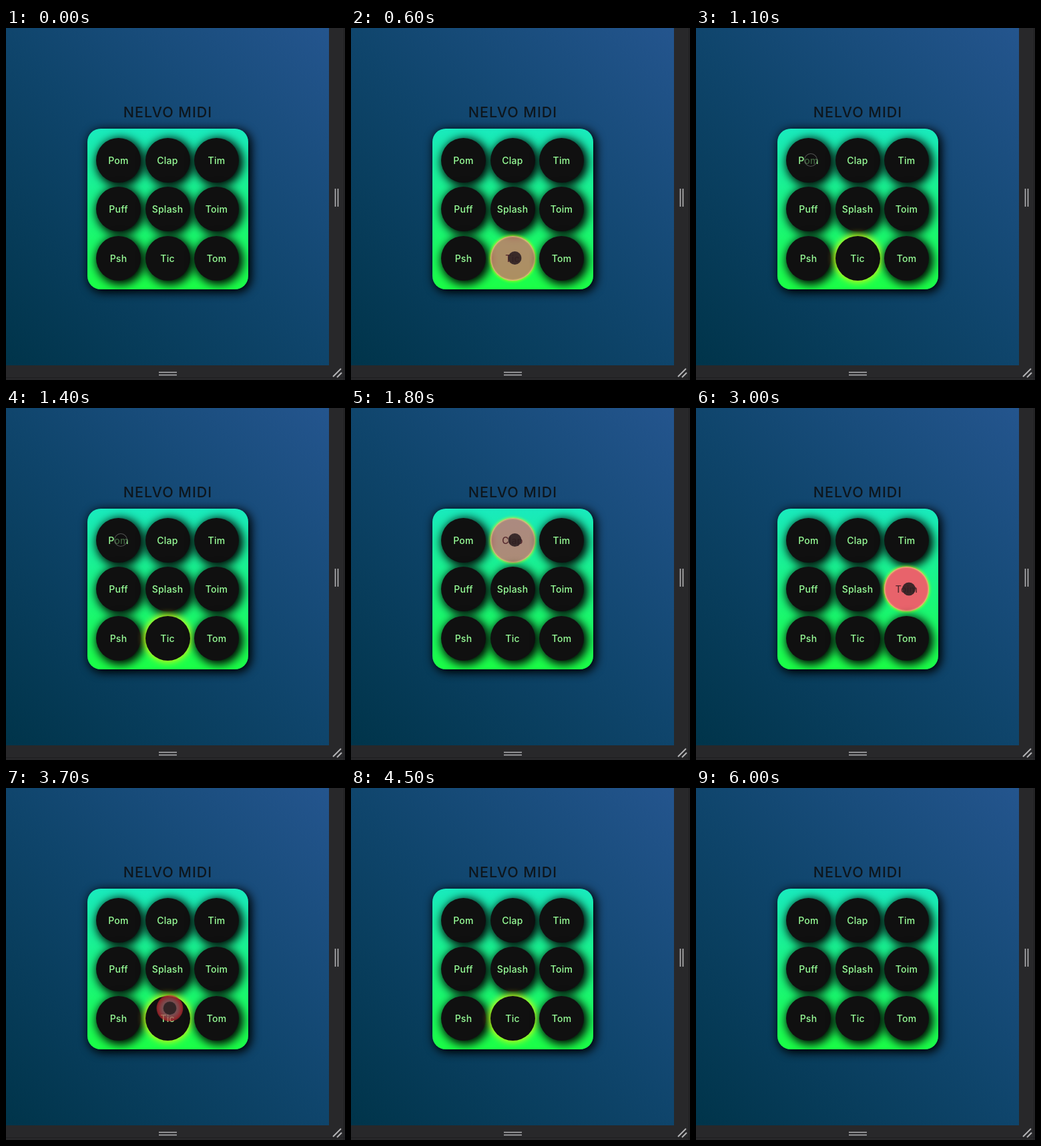
An HTML page for the animation above (6.6 s loop, 508 by 528 pixels).

```html
<!DOCTYPE html>
<html lang="pt">
<head>
<meta charset="utf-8">
<title>NELVO MIDI</title>
<style>
  html, body { margin: 0; width: 100%; height: 100%; overflow: hidden; background: #28282a; }
  #stage { position: absolute; left: 0; top: 0; width: 508px; height: 528px; overflow: hidden;
    font-family: Inter, "Open Sans", sans-serif; font-weight: 500; }
  #page { position: absolute; left: 0; top: 0; width: 484px; height: 506px; overflow: hidden;
    background: linear-gradient(45deg, #00344a, #0f456c 50%, #24558e); }
  #stage svg { position: absolute; left: 0; top: 0; }
  h1 { position: absolute; left: 0; top: 113px; width: 485px; margin: 0; text-align: center;
    font-size: 21.5px; line-height: 27px; font-weight: 500; letter-spacing: 1px; color: #0d161d; }
  #pad { position: absolute; left: 122px; top: 151px; width: 241px; height: 241px; border-radius: 20px;
    background: linear-gradient(#19eabd, #1bff46); box-shadow: 3px 3px 14px 2px #000; }
  .key { position: absolute; width: 67px; height: 67px; border-radius: 50%; background: #101010;
    color: #98ff98; font-size: 14px; line-height: 67px; letter-spacing: .25px; text-align: center;
    box-shadow: 3px 3px 14px 3px #000; }
  .key.focus { box-shadow: 0 0 12px 1px #ff0; }
  .key.down { color: #55282d; box-shadow: inset 0 0 2px 1px #e6d27a, 0 0 5px #ff0; }
  #dot, #halo { position: absolute; left: 0; top: 0; border-radius: 50%; }
  #dot { width: 18px; height: 18px; margin: -10px; background: rgba(16,16,16,.65);
    border: 1px solid rgba(150,150,150,.5); }
  #dot.press { background: rgba(45,32,34,.9); border-color: rgba(60,45,47,.7); }
  #halo { width: 40px; height: 40px; margin: -20px;
    background: radial-gradient(circle, rgba(150,105,108,.75) 9px, rgba(165,85,90,.75) 13px,
      rgba(195,45,52,.72) 18px, rgba(195,45,52,.5) 20px); }
</style>
</head>
<body>
<div id="stage">
  <div id="page">
    <h1>NELVO MIDI</h1>
    <div id="pad"></div>
    <div id="halo"></div>
    <div id="dot"></div>
  </div>
  <svg width="508" height="528" fill="none">
    <path d="M506.5 0V528M0 524.5H508" stroke="#1e1e20"/>
    <path d="M493.5 241V268M497.5 241V268M229 516.5H256M229 520.5H256" stroke="#b4b4b6" stroke-width="1.6"/>
    <path d="M490 523L502 511M496 524L503 517" stroke="#b4b4b6" stroke-width="2"/>
  </svg>
</div>
<script>
const LOOP = 6600, STEP = 100, BLUR_AT = 5500, PITCH = 73.5, TRAVEL = 300;
const names = ["Pom", "Clap", "Tim", "Puff", "Splash", "Toim", "Psh", "Tic", "Tom"];
const [pad, dot, halo] = ["pad", "dot", "halo"].map(id => document.getElementById(id));

const keys = names.map((name, i) => {
  const el = document.createElement("div");
  el.className = "key";
  el.textContent = name;
  el.style.left = 13 + (i % 3) * PITCH + "px";
  el.style.top = 13.5 + Math.floor(i / 3) * PITCH + "px";
  pad.append(el);
  return el;
});

// Pointer stops in key units: [time, column, row]
const stops = [
  [100, 4.3, 1.4],
  [600, 1, 2], [1500, 0, 0], [1800, 1, 0], [2200, 2, 0], [2900, 2, 1], [3300, 1, 2],
  [4100, 1, 1.8], [4500, 4.3, 1.4]
];
const presses = stops.slice(1, -2);

// Rest briefly at each stop, then ease to the next one
function pointAt(t) {
  const i = stops.findIndex(s => s[0] > t);
  if (i < 1) return null;
  const [t0, c0, r0] = stops[i - 1], [t1, c1, r1] = stops[i];
  const span = Math.min(TRAVEL, t1 - t0 - STEP);
  const k = Math.max(0, Math.min(1, (t - t0 - STEP) / span));
  const e = k * k * (3 - 2 * k);
  return [172 + PITCH * (c0 + (c1 - c0) * e), 198 + PITCH * (r0 + (r1 - r0) * e)];
}

function draw(t) {
  const last = presses.filter(p => p[0] <= t).pop();
  const age = last ? t - last[0] : Infinity;
  const focused = last && t < BLUR_AT ? last[1] + 3 * last[2] : -1;
  const level = age < TRAVEL ? Math.sin(Math.PI * (age + STEP) / 400) : 0;

  keys.forEach((el, i) => {
    const down = i === focused && level > 0;
    el.className = "key" + (down ? " down" : i === focused ? " focus" : "");
    el.style.background = down ? `rgba(232, 99, 107, ${level})` : "";
  });

  const at = pointAt(t);
  dot.style.display = at ? "block" : "none";
  dot.className = age < 500 ? "press" : "";
  halo.style.display = at && age >= TRAVEL && age < 500 ? "block" : "none";
  if (at) dot.style.transform = halo.style.transform = `translate(${at[0]}px, ${at[1]}px)`;
}

const start = performance.now();
function tick() {
  const t = (performance.now() - start) % LOOP;
  draw(Math.floor(t / STEP) * STEP);
  requestAnimationFrame(tick);
}
tick();
</script>
</body>
</html>
```
